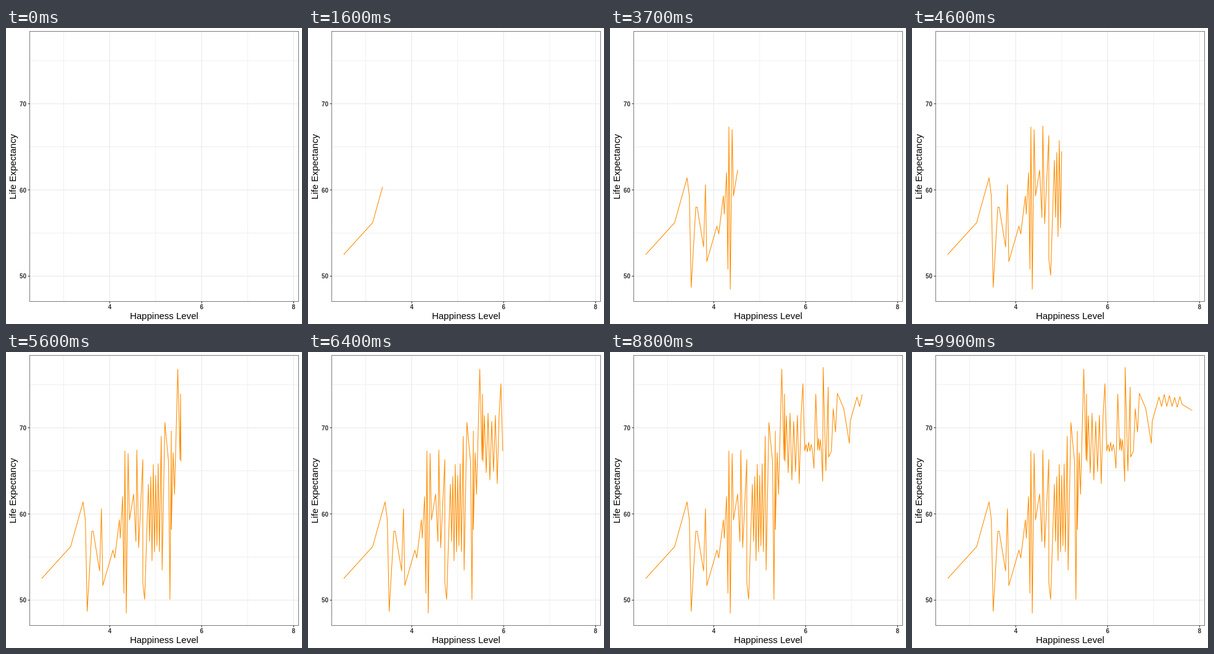
These frames come from a looping animation (480x480 px, 10000 ms). An HTML page:

```html
<!DOCTYPE html>
<html lang="en">
<head>
<meta charset="utf-8">
<title>Life expectancy by happiness</title>
<style>
  html, body { margin: 0; width: 100%; height: 100%; overflow: hidden; background: #fff; }
  svg { display: block; width: 480px; height: 480px; }
  text { font-family: "Liberation Sans", Arial, sans-serif; text-anchor: middle; }
  .major { stroke: #ebebeb; stroke-width: 1.3; }
  .minor { stroke: #ebebeb; stroke-width: .8; }
  .tick { stroke: #333; stroke-width: 1.07; }
  .label { font-size: 10px; font-weight: bold; fill: #333; }
  .title { font-size: 15px; }
</style>
</head>
<body>
<svg viewBox="0 0 480 480">
  <g id="grid"></g>
  <polyline id="line" fill="none" stroke="#ff8c00" stroke-width="1.07" stroke-linejoin="round"/>
  <rect x="38.5" y="5.5" width="436" height="438" fill="none" stroke="#7a7a7a"/>
  <g id="axes"></g>
  <text class="title" x="256.4" y="472">Happiness Level</text>
  <text class="title" transform="translate(16 225) rotate(-90)">Life Expectancy</text>
</svg>
<script>
const STEPS = 100, STEP_MS = 100;
const px = v => 168.2 + (v - 4) * 74.55;
const py = v => 262.6 - (v - 60) * 13.98;

const line = (cls, x1, y1, x2, y2) =>
  `<line class="${cls}" x1="${x1}" y1="${y1}" x2="${x2}" y2="${y2}"/>`;
const label = (x, y, s) => `<text class="label" x="${x}" y="${y}">${s}</text>`;
const gridX = (cls, v) => line(cls, px(v), 6, px(v), 443);
const gridY = (cls, v) => line(cls, 39, py(v), 474, py(v));
const xTicks = [4, 6, 8], yTicks = [50, 60, 70];

grid.innerHTML = [
  ...xTicks.map(v => gridX("minor", v - 1) + gridX("major", v)),
  ...yTicks.map(v => gridY("minor", v + 5) + gridY("major", v))
].join("");
axes.innerHTML = [
  ...xTicks.map(v => line("tick", px(v), 443.5, px(v), 446.5) + label(px(v), 456, v)),
  ...yTicks.map(v => line("tick", 35.5, py(v), 38.5, py(v)) + label(27.5, py(v) + 4, v))
].join("");

let seed = 7;
const random = () => (seed = seed * 16807 % 2147483647) / 2147483647;

// Evenly spaced swings between levels a and b, slightly uneven in height.
const zigzag = (from, to, count, a, b) => Array.from({ length: count }, (_, i) => [
  from + (to - from) * i / (count - 1),
  (i % 2 ? b : a) + (random() - .5) * (a - b) / 3
]);

// Landmarks as [happiness, life expectancy], with dense stretches by rule.
const curve = [
  [2.52, 52.5], [3.15, 56.2], [3.42, 61.4], [3.47, 59.3], [3.51, 48.7],
  [3.61, 58], [3.64, 58], [3.78, 53.4], [3.82, 60.6], [3.85, 51.7],
  [4.07, 55.8], [4.11, 54.9], [4.21, 59.3], [4.23, 57.2], [4.28, 62],
  [4.31, 50.8], [4.33, 67.3], [4.36, 48.5], [4.4, 67], [4.43, 59.3],
  [4.52, 62.3], [4.57, 56.8], [4.59, 67.4], [4.63, 56.1], [4.72, 66.3],
  [4.72, 52], [4.76, 50.1],
  ...zigzag(4.84, 5.08, 10, 65, 55.5),
  [5.12, 69], [5.14, 53.5], [5.2, 70.6], [5.28, 66], [5.31, 50.1],
  [5.34, 69.6], [5.34, 58.2], [5.38, 67.1], [5.41, 62.3], [5.48, 76.8],
  [5.53, 66.3], [5.54, 73.9], [5.55, 66.1],
  ...zigzag(5.58, 5.9, 9, 71, 64.5), [5.94, 75.1],
  ...zigzag(5.98, 6.15, 7, 67.3, 68.2),
  [6.18, 65.3], [6.22, 73.9],
  ...zigzag(6.26, 6.34, 5, 67.5, 68.8),
  [6.37, 63.8], [6.38, 77], [6.44, 65], [6.49, 74.7], [6.5, 66.6],
  [6.56, 67.3], [6.6, 72.2], [6.65, 69.5], [6.69, 74], [6.83, 72.2],
  [6.95, 68.2], [6.97, 70.8],
  ...zigzag(7.06, 7.57, 10, 72.4, 73.7),
  [7.62, 72.7], [7.84, 72]
];

// Each point appears on its nearest step; the head glides between them.
const first = curve[0][0], span = curve.at(-1)[0] - first;
const points = curve.map(([h, life]) => ({
  x: px(h), y: py(life),
  step: Math.round((h - first) / span * (STEPS - 1))
}));

const path = document.getElementById("line");
function draw(now) {
  const step = Math.floor(now / STEP_MS) % STEPS;
  const shown = points.filter(p => p.step <= step);
  const a = shown.at(-1), b = points[shown.length];
  if (b) {
    const k = (step - a.step) / (b.step - a.step);
    shown.push({ x: a.x + (b.x - a.x) * k, y: a.y + (b.y - a.y) * k });
  }
  path.setAttribute("points", step ? shown.map(p => p.x + "," + p.y).join(" ") : "");
}

const start = performance.now();
function tick() {
  draw(performance.now() - start);
  requestAnimationFrame(tick);
}
tick();
</script>
</body>
</html>
```
